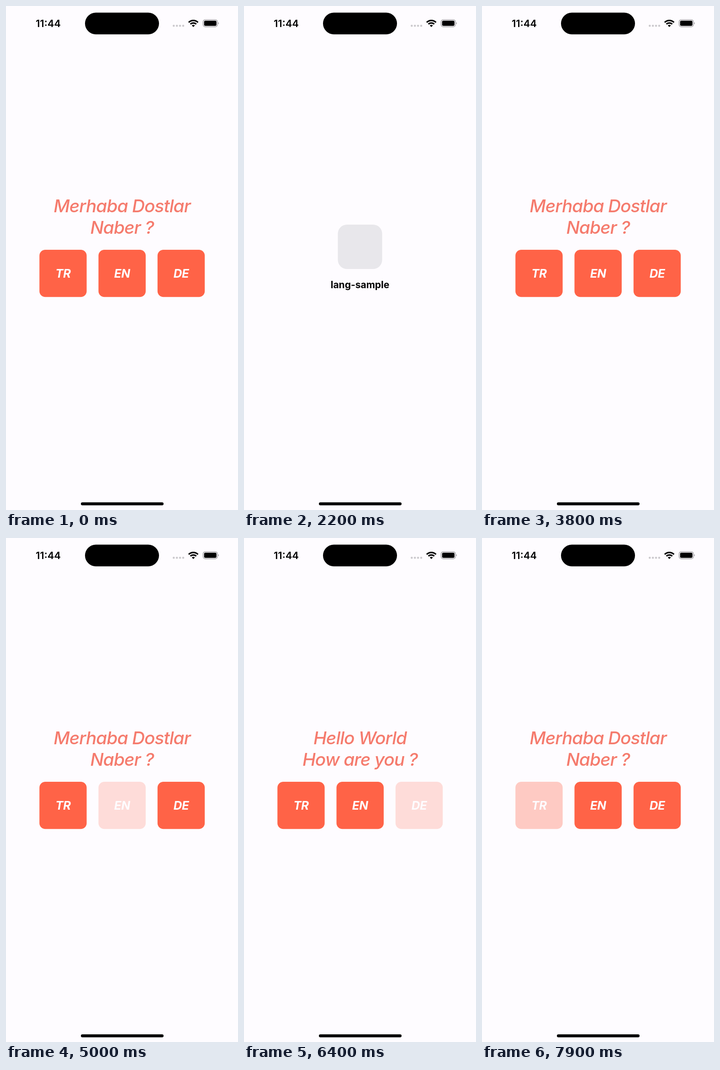
Animation of 508 by 1102 pixels, one loop 8 s. Source, as an HTML page:

```html
<!DOCTYPE html>
<html lang="tr">
<head>
<meta charset="utf-8">
<title>Language switcher</title>
<style>
  html, body { margin: 0; width: 100%; height: 100%; overflow: hidden; background: #fefcff; }
  svg { display: block; width: 508px; height: 1102px; font-family: Inter, sans-serif; }
  text { text-anchor: middle; }
  .greeting { font: italic 500 38.8px Inter, sans-serif; letter-spacing: -.95px; fill: #f57b6d; }
  .button text { font: italic 700 25.8px Inter, sans-serif; letter-spacing: -.4px; fill: #fefcff; }
  .button rect { fill: #ff6347; }
</style>
</head>
<body>
<svg viewBox="0 0 508 1102">
  <g id="status">
    <text x="92.5" y="46" font-size="22" font-weight="600">11:44</text>
    <rect x="173" y="14.5" width="162" height="47.5" rx="23.75"/>
    <path d="M367.3 43.3h24" stroke="#cbc9cd" stroke-width="4.6" stroke-linecap="round" stroke-dasharray="0 6.9"/>
    <g fill="none" stroke="#000" stroke-width="3.3">
      <path d="M400 35.8a14.4 14.4 0 0 1 20.4 0M403.8 39.7a9 9 0 0 1 12.8 0"/>
    </g>
    <path d="M410.2 46l-3.4-3.4a4.8 4.8 0 0 1 6.8 0z"/>
    <rect x="431.5" y="29.8" width="31.5" height="15.8" rx="5" fill="none" stroke="#98969a" stroke-width="1.3"/>
    <rect x="433.7" y="32" width="27.2" height="11.4" rx="3"/>
    <path d="M464.6 35.2q3 2.5 0 5z" fill="#98969a"/>
  </g>

  <g id="opening">
    <g id="spinner" transform="translate(174 481.3)" stroke="#000" stroke-width="3.3" stroke-linecap="round"></g>
    <text x="272" y="488" font-size="18.1" font-weight="500" letter-spacing="-.4">Opening project...</text>
    <rect x="200.5" y="531.5" width="107.5" height="45" rx="4" fill="none" stroke="#545256" stroke-width="1.3"/>
    <text x="254" y="561" font-size="18.1" font-weight="600" fill="#4c4a4e">Go back</text>
  </g>

  <g id="splash">
    <rect x="205.5" y="478" width="97" height="97" rx="20" fill="#e8e7eb"/>
    <text x="254" y="617" font-size="21" font-weight="700">lang-sample</text>
  </g>
  <g id="bundling">
    <path d="M0 1012.5h508" stroke="#e0dee2"/>
    <text x="254" y="1040" font-size="15.5" fill="#555">Bundling 100.00%</text>
  </g>

  <g id="app"></g>

  <g id="refresh">
    <rect y="993" width="508" height="109" fill="#3f3c40"/>
    <text x="254" y="1025" font-size="19.4" letter-spacing="-.15" fill="#fefcff">Refreshing...</text>
    <text x="254" y="1047" font-size="18.1" letter-spacing="-.2" fill="#cfcdd0">Don't see your changes? Reload the app</text>
  </g>
  <rect id="home" x="164" y="1085.3" width="181" height="6.4" rx="3.2"/>
</svg>
<script>
const LOOP = 8000, STEP = 100, LINE = 47;
const GREETINGS = {
  TR: ['Merhaba Dostlar', 'Naber ?'],
  EN: ['Hello World', 'How are you ?'],
  DE: ['Hallo Welt', 'Wie geht es', 'Ihnen ?']
};
// Opacity of a pressed button, one value per step from its start time.
const PRESSES = {
  EN: { start: 5000, levels: [.2, .32, .75] },
  DE: { start: 6400, levels: [.2, .2, .55] },
  TR: { start: 7800, levels: [.2, .32] }
};

const byId = id => document.getElementById(id);
const show = (id, visible) => byId(id).style.display = visible ? '' : 'none';
const between = (t, from, to) => t >= from && t < to;
const easeInOut = p => p < .5 ? 2 * p * p : 1 - 2 * (1 - p) ** 2;

byId('spinner').innerHTML = Array.from({ length: 8 }, (_, i) =>
  `<path d="M-6.5 0H-11.3" transform="rotate(${-45 * i})" opacity="${Math.max(.27, .85 - .12 * i)}"/>`).join('');

function renderApp(t) {
  const lang = between(t, 5100, 6600) ? 'EN' : between(t, 6600, 7900) ? 'DE' : 'TR';
  const lines = GREETINGS[lang];
  const shift = (lines.length - 2) * LINE / 2;
  const greeting = lines.map((line, i) =>
    `<text class="greeting" x="254" y="${451 - shift + i * LINE}">${line}</text>`);
  const buttons = Object.keys(GREETINGS).map((name, i) => {
    const { start, levels } = PRESSES[name];
    const opacity = levels[(t - start) / STEP] ?? 1;
    return `<g class="button" transform="translate(${73.2 + i * 129.3} ${532.9 + shift})" opacity="${opacity}">
      <rect width="103.4" height="103.4" rx="12.9"/><text x="51.7" y="61">${name}</text></g>`;
  });
  byId('app').innerHTML = greeting.concat(buttons).join('');
}

let last = -1;
function frame(now) {
  const t = Math.floor(now % LOOP / STEP) * STEP;
  if (t !== last) {
    last = t;
    const refreshing = between(t, 2500, 3800);
    show('opening', t === 1500);
    show('bundling', between(t, 1600, 2200));
    show('splash', between(t, 1900, 2500));
    show('app', !between(t, 1500, 2500));
    show('refresh', refreshing);
    const slide = Math.min(1, Math.max(0, (t - 3530) / 350));
    byId('refresh').setAttribute('transform', `translate(0 ${194 * easeInOut(slide)})`);
    byId('home').setAttribute('fill', refreshing ? '#4c494d' : '#000');
    renderApp(t);
  }
  requestAnimationFrame(frame);
}
frame(performance.now());
</script>
</body>
</html>
```
